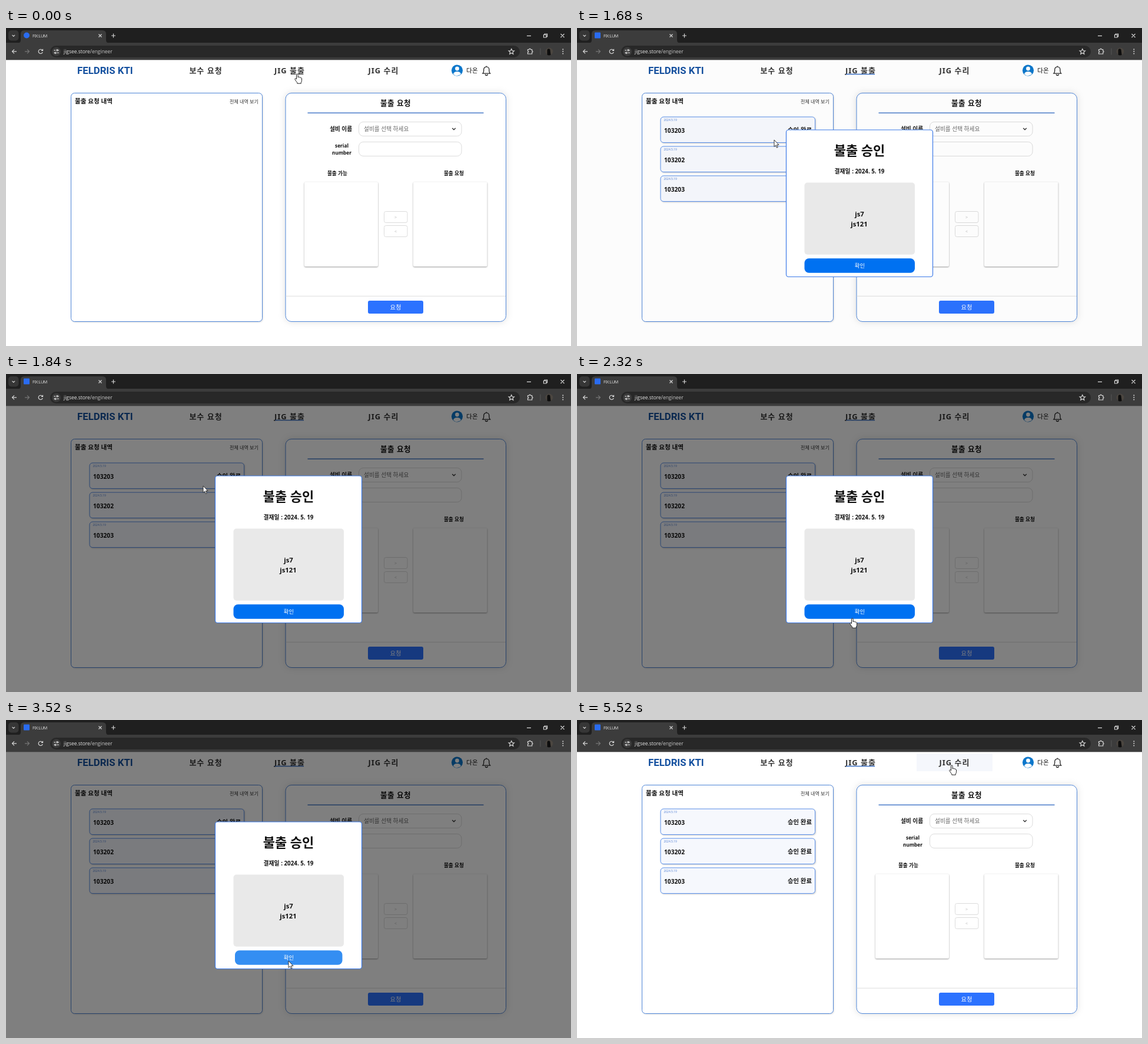
Recreate the animation shown at these times as an HTML page. Size 960 by 540 pixels, loop 5600 ms.

```html
<!DOCTYPE html>
<html lang="ko">
<head>
<meta charset="utf-8">
<style>
html, body { margin: 0; width: 100%; height: 100%; overflow: hidden; background: #fff; }
svg { display: block; width: 960px; height: 540px; }
text { font-family: "Noto Sans", "Noto Sans CJK KR", sans-serif; fill: #111; white-space: pre; }
.b { font-weight: 700; }
.m { text-anchor: middle; }
.e { text-anchor: end; }
.ui { font-family: "Open Sans", sans-serif; fill: #e3e3e3; }
.nav { font-size: 13px; letter-spacing: 1px; fill: #333; }
.ln { fill: none; stroke: #d6d6d6; stroke-width: 1.2; }
.box { fill: #fff; stroke: #dcdcdc; }
.panel { fill: #fff; stroke: #4f86d8; }
.list { fill: #fff; filter: drop-shadow(0 1px 1px rgba(0,0,0,.4)); }
.card { fill: #f6f8fd; stroke: #5b91ec; filter: drop-shadow(1.5px 1.5px 1px rgba(0,0,0,.2)); }
</style>
</head>
<body>
<svg viewBox="0 0 960 540">
  <rect width="960" height="540" fill="#fff"/>

  <!-- page header -->
  <rect id="hover" x="577" y="57" width="129" height="30" fill="#f5f7fc"/>
  <text x="121" y="78" class="b" style="font:700 16.8px Roboto,sans-serif;fill:#14509f">FELDRIS KTI</text>
  <text x="339.5" y="77" class="b m nav">보수 요청</text>
  <text x="482" y="77" class="b m nav">JIG 불출</text>
  <text x="641.5" y="77" class="b m nav">JIG 수리</text>
  <path id="underline" d="M457 78.5H506" stroke="#3a6fc4" stroke-width="1.3"/>
  <circle cx="766.5" cy="72" r="9.6" fill="#0c77cb"/>
  <circle cx="766.5" cy="69" r="3.4" fill="#fff"/>
  <path d="M760 78.3a6.6 5.2 0 0 1 13 0a9 9 0 0 1-13 0z" fill="#fff"/>
  <text x="792" y="75.5" class="m" font-size="10.5">다온</text>
  <path d="M810 77.2h12.6q-1.7-1.8-1.7-4.5v-2.2a4.6 4.6 0 0 0-9.2 0v2.2q0 2.700-1.700 4.500zM814.400 78.500a2 2 0 0 0 4 0M816.300 65.600v-1.200" fill="none" stroke="#222" stroke-width="1.300"/>

  <!-- history panel -->
  <rect class="panel" x="110.5" y="110.5" width="325" height="388" rx="6" style="filter:drop-shadow(1px 1px 1px rgba(0,0,0,.12))"/>
  <text x="117" y="127.500" class="b" font-size="10.600">불출 요청 내역</text>
  <text x="429" y="127.500" class="e" font-size="8.100" style="fill:#333">전체 내역 보기</text>
  <g id="cards"></g>

  <!-- request panel -->
  <rect class="panel" x="475" y="110.5" width="374.500" height="388" rx="10" style="filter:drop-shadow(0 0 6px rgba(0,0,0,.13))"/>
  <text x="662" y="132" class="b m" font-size="12.600" letter-spacing=".5">불출 요청</text>
  <path d="M512.500 144.300H811.500" stroke="#4a7cc9" stroke-width="1.500"/>
  <text x="569" y="174.500" class="b m" font-size="9.700">설비 이름</text>
  <rect class="box" x="599.500" y="159.500" width="174.500" height="24" rx="7.500"/>
  <text x="608" y="174.500" font-size="9.700" style="fill:#666">설비를 선택 하세요</text>
  <path d="M758.200 170l2.800 2.800l2.800-2.800" fill="none" stroke="#333" stroke-width="1.300"/>
  <text x="570.500" y="203" class="b m" font-size="8.300">serial</text>
  <text x="570.500" y="215" class="b m" font-size="8.300">number</text>
  <rect class="box" x="599.500" y="193.500" width="174.500" height="24" rx="7.500"/>
  <text x="563" y="249.500" class="b m" font-size="8.700">불출 가능</text>
  <text x="761" y="249.500" class="b m" font-size="8.700">불출 요청</text>
  <rect class="list" x="507" y="261.500" width="125" height="143.500" rx="2"/>
  <rect class="list" x="692" y="261.500" width="125.500" height="143.500" rx="2"/>
  <rect class="box" x="642.500" y="311.500" width="39.500" height="19" rx="3"/>
  <rect class="box" x="642.500" y="335.500" width="39.500" height="19" rx="3"/>
  <text x="662" y="323.500" class="m" font-size="7" style="fill:#bbb">&gt;</text>
  <text x="662" y="347.500" class="m" font-size="7" style="fill:#bbb">&lt;</text>
  <path d="M475.500 455.300H849" stroke="#dedede"/>
  <rect x="615" y="463" width="94" height="22" rx="3" fill="#2c72ff"/>
  <text x="662" y="477.800" class="m" font-size="10.400" style="fill:#fff">요청</text>

  <rect id="shade" y="54" width="960" height="486"/>

  <!-- approval dialog -->
  <g id="dialog">
    <rect x="355.500" y="173" width="249" height="249.500" rx="4" fill="#fff" stroke="#3c7ae8" stroke-width="1.200"/>
    <text x="480" y="216" class="b m" font-size="22">불출 승인</text>
    <text x="480" y="246.500" class="b m" font-size="9.800">결재일 : 2024. 5. 19</text>
    <rect x="386.500" y="262.500" width="187.500" height="122.300" rx="5" fill="#e9e9e9"/>
    <text x="480" y="319.500" class="b m" font-size="11.300">js7</text>
    <text x="479.500" y="336.500" class="b m" font-size="11.300">js121</text>
    <rect id="ok" y="391.300" height="24.500" rx="7.500"/>
    <text x="480.500" y="407" class="m" font-size="9.400" style="fill:#fff">확인</text>
  </g>

  <!-- browser frame -->
  <rect width="960" height="26" fill="#1f1f1f"/>
  <rect y="25" width="960" height="29.300" fill="#3c3c3c"/>
  <rect x="4" y="4" width="17.500" height="17.500" rx="5" fill="#363636"/>
  <path class="ln" d="M10.500 11.800l2.300 2.300l2.300-2.300"/>
  <path d="M20 25.500q5 0 5-5V10q0-6 6-6H164q6 0 6 6V20.500q0 5 5 5z" fill="#3c3c3c"/>
  <rect id="icon" x="30" y="7.500" width="10" height="10" fill="#2a6cf0"/>
  <text x="45" y="16" class="ui" font-size="7.200" letter-spacing="-.3">FIX:LUM</text>
  <path class="ln" d="M157.500 10.500l5 5m0-5l-5 5M179 13h7m-3.500-3.500v7"/>
  <path class="ln" d="M885 13.300h7M942.500 10l6 6m0-6l-6 6M913.500 11.500h4.500v4.500h-4.500zM915 11.300V10h4.600v4.600h-1.400"/>
  <path class="ln" d="M18 39.800h-7.500m3.500-3.500l-3.500 3.500l3.500 3.500"/>
  <path class="ln" d="M32 39.800h7.500m-3.500-3.500l3.500 3.500l-3.500 3.500" style="stroke:#757575"/>
  <path class="ln" d="M62 38.200a3.600 3.600 0 1 0 .2 2.800M62.500 35.800v2.700h-2.700"/>
  <rect x="75" y="30" width="798" height="20" rx="10" fill="#282828"/>
  <circle cx="85.500" cy="40" r="7.500" fill="#3c3c3c"/>
  <path class="ln" d="M81.500 37.800h2.500m3.500 0h2.200M81.500 42.200h2.200m3 0h3"/>
  <circle class="ln" cx="87" cy="37.800" r="1.200"/><circle class="ln" cx="84" cy="42.200" r="1.200"/>
  <text x="98" y="43" class="ui" font-size="8.460">jigsee.store<tspan fill="#c6c6c6">/engineer</tspan></text>
  <path class="ln" d="M858.800 35.500l1.400 3l3.300.3l-2.500 2.200l.8 3.300l-3-1.800l-3 1.800l.8-3.300l-2.500-2.200l3.300-.3z" stroke-width="1"/>
  <path class="ln" d="M886.500 36.500h2.300a1.300 1.300 0 0 1 2.600 0h2.300v2.300a1.300 1.300 0 0 1 0 2.600v2.600h-7.200v-2.600a1.300 1.300 0 0 0 0-2.600z"/>
  <path d="M908 34.500v11" stroke="#555"/>
  <circle cx="923" cy="40" r="6.500" fill="#4b4640"/>
  <path d="M919.500 45.500v-7a2.600 3.300 0 0 1 5.200 0l1 7.300a6.500 6.500 0 0 1-6.200-.3z" fill="#0d0d0d"/>
  <g fill="#d6d6d6"><circle cx="946.300" cy="36.200" r="1"/><circle cx="946.300" cy="39.800" r="1"/><circle cx="946.300" cy="43.400" r="1"/></g>

  <g id="cursor" stroke="#222" stroke-linejoin="round" fill="#fff">
    <path id="arrow" stroke-width=".9" d="M0 0V11.500L2.600 9.200L4.400 13.300L6.200 12.500L4.400 8.500H8z"/>
    <path id="hand" stroke-width="1" d="M-1.500 1.200a1.300 1.300 0 0 1 2.600 0V5.800q.2-1 1.300-.8q1 .1 1.100 1.200q.3-.8 1.200-.6q.9.200 1 1.200q.4-.5 1.100-.2q.7.300.7 1.300v3.600q0 1.500-1.200 3v1.700h-6.500v-1.500q-1.600-1.800-3.600-5q-.9-1.500.2-2q.9-.4 2.100 1.200z"/>
  </g>
</svg>
<script>
const LOOP = 5600, STEP = 80;
const LOADED = 160, OPEN = 1677, PRESS = 3360, CLOSE = 3520, FADE = 150;
const $ = id => document.getElementById(id);
const show = (id, on) => $(id).setAttribute('visibility', on ? 'visible' : 'hidden');
const set = (id, attrs) => { for (const k in attrs) $(id).setAttribute(k, attrs[k]); };
const clamp = v => Math.max(0, Math.min(1, v));

// pointer tip: time, x, y
const path = [
  [0, 495, 78], [160, 495, 78], [1040, 340, 200], [1280, 340, 200], [1600, 335, 190],
  [1840, 335, 190], [2320, 468, 415], [2720, 468, 415], [3280, 480, 409],
  [3600, 480, 409], [4400, 535, 145], [4560, 535, 145], [5360, 637, 77], [LOOP, 637, 77]
];

$('cards').innerHTML = ['103203', '103202', '103203'].map((id, i) => `
  <g transform="translate(0 ${i * 50})">
    <rect class="card" x="142" y="151" width="262.500" height="43.500" rx="5"/>
    <text x="147.500" y="158" font-size="4.900" style="fill:#5a86d6">2024.5.19</text>
    <text x="148" y="177.500" class="b" font-size="10.200">${id}</text>
    <text x="399" y="176.500" class="b e" font-size="10.400">승인 완료</text>
  </g>`).join('');

function pointer(t) {
  const i = path.findIndex((p, n) => n && t <= p[0]);
  const [t0, x0, y0] = path[i - 1], [t1, x1, y1] = path[i];
  let k = (t - t0) / (t1 - t0);
  k = k * k * (3 - 2 * k);
  return [x0 + (x1 - x0) * k, y0 + (y1 - y0) * k];
}

function draw(t) {
  const loaded = t >= LOADED;
  show('cards', loaded);
  show('underline', loaded);
  set('icon', { rx: loaded ? 1 : 5 });

  const fade = clamp((t - OPEN) / FADE) - clamp((t - CLOSE) / FADE);
  set('shade', { opacity: fade * 0.5 });
  set('dialog', { opacity: t < CLOSE ? 1 : fade });
  const open = t >= OPEN && fade > 0;
  show('dialog', open);
  const press = t >= PRESS;
  set('ok', press ? { x: 389, width: 182.5, fill: '#348ef2' } : { x: 386.5, width: 187.5, fill: '#0071f1' });

  const [x, y] = pointer(t);
  const onRepair = x > 577 && x < 706 && y < 87;
  const onIssue = x > 418 && x < 546 && y < 87;
  const onOk = open && !press && y > 391 && x > 387;
  const hand = onRepair || onIssue || onOk;
  show('hover', onRepair);
  show('hand', hand);
  show('arrow', !hand);
  set('cursor', { transform: `translate(${x.toFixed(1)} ${y.toFixed(1)})` });
}

const start = performance.now();
function tick() {
  const t = (performance.now() - start) % LOOP;
  draw(Math.floor(t / STEP) * STEP);
  requestAnimationFrame(tick);
}
draw(0);
requestAnimationFrame(tick);
</script>
</body>
</html>
```
